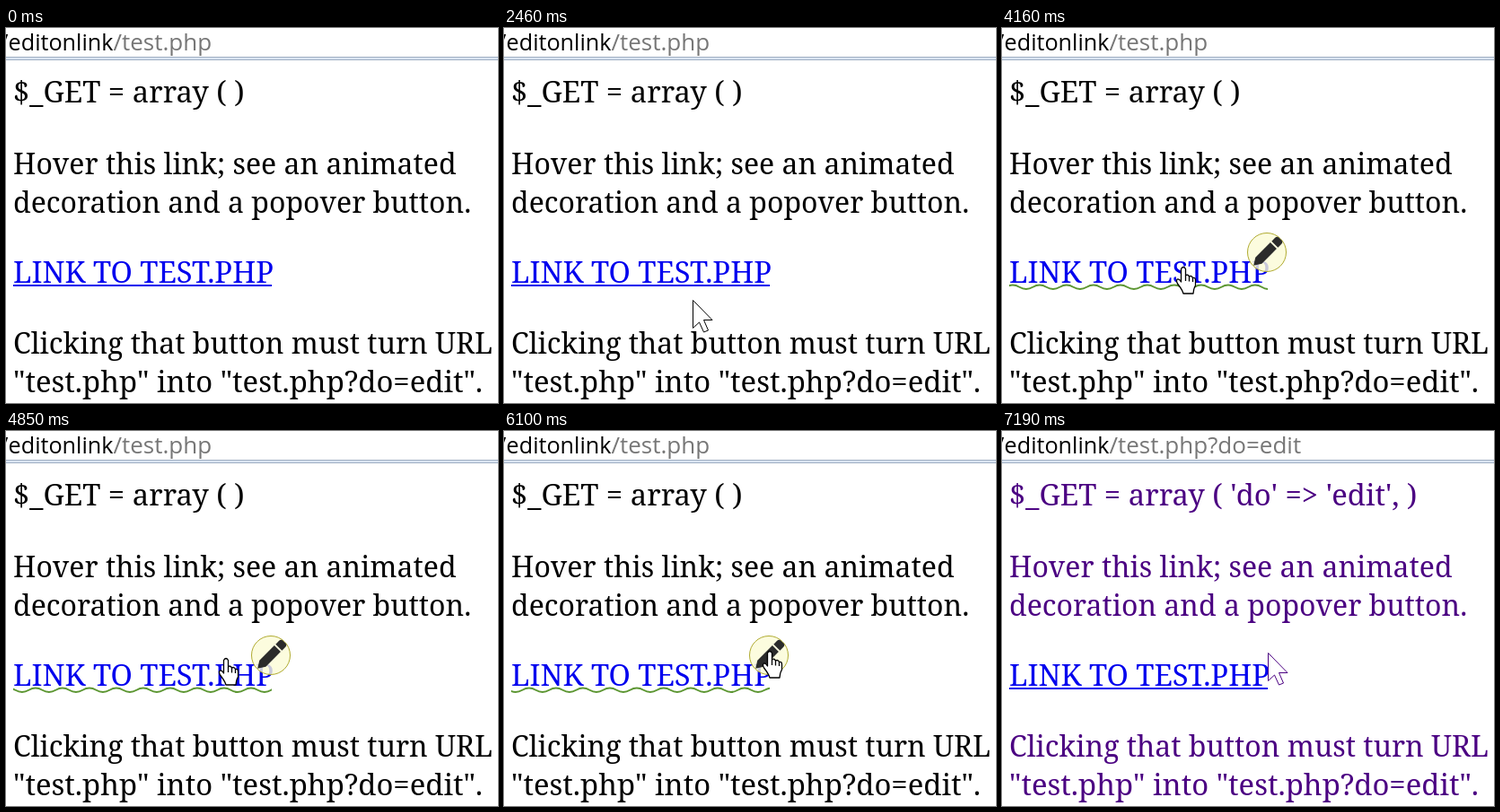
These frames come from a looping animation (548 px wide and 418 px high, 8000 ms). An HTML page:

```html
<!DOCTYPE html>
<html lang="en">
<head>
<meta charset="utf-8">
<title>Edit on link</title>
<style>
  html, body { margin: 0; width: 100%; height: 100%; overflow: hidden; background: #fff; }
  svg { display: block; }
  .bar { font: 25.2px "Open Sans", sans-serif; }
  #address { font-size: 26px; }
  .page { font: 32px "Noto Serif", serif; }
  .code { font-size: 32.8px; }
</style>
</head>
<body>
<svg width="548" height="418" viewBox="0 0 548 418">
  <defs><clipPath id="underlineBox"><rect x="8" y="284" width="288" height="9"/></clipPath></defs>

  <g class="bar">
    <text x="119.5" y="25" text-anchor="end">/editonlink</text>
    <text id="address" x="119.5" y="25" fill="#777"></text>
  </g>
  <rect y="32" width="548" height="4" fill="#d9e4f1"/>
  <path d="M0 32.5H548M0 35.5H548" stroke="#a0afc3"/>

  <g class="page" id="body">
    <text class="code" id="query" x="8" y="83"></text>
    <text x="8" y="162.5">Hover this link; see an animated</text>
    <text x="8" y="205.5">decoration and a popover button.</text>
    <text class="code" x="8" y="284" fill="#00e">LINK TO TEST.PHP</text>
    <text x="8" y="363">Clicking that button must turn URL</text>
    <text class="code" x="8" y="406">"test.php" into "test.php?do=edit".</text>
  </g>

  <path id="underline" d="M8 287H296" stroke="#00e" stroke-width="2"/>
  <g id="squiggle" clip-path="url(#underlineBox)">
    <path id="wave" fill="none" stroke="#5c9632" stroke-width="2"/>
  </g>

  <g id="button">
    <circle r="21.5" fill="#fcfcd6" fill-opacity=".8" stroke="#b0ab30"/>
    <path transform="rotate(-45)" fill="#2b2b2b"
      d="M-21 0L-13-5H10.5V5H-13ZM12.5-5H18Q21-5 21-2V2Q21 5 18 5H12.5Z"/>
  </g>

  <g id="cursor" fill="#fff" stroke-linejoin="round">
    <path id="arrow" transform="translate(-1 0)" d="M.5.5V31.5L7.5 25L12.5 36L17.5 34L12.5 22.5H22Z"/>
    <g id="hand" transform="translate(-9 -1)" stroke-width="1.3">
      <path d="M5.5 2.5Q8-1.5 10.5 2.5V10Q13 8 14.5 11Q17 9.5 18.5 12.5Q21.5 11.5 21.5 15.5V21Q19.5 24 19 30H8Q7 26 1.5 19Q-.5 15 1.5 14Q3.5 13.5 5.5 17Z"/>
      <path d="M10.5 10V16M14.5 11V16.5M18.5 12.5V17" fill="none"/>
    </g>
  </g>
</svg>
<script>
const LOOP = 8000, ENTER = 910, HOVER = 2760, CLICK = 7040, RELEASE = 7190;
const WAVE = 30, SHIFT_MS = 300;
const $ = id => document.getElementById(id);
const show = (id, on) => $(id).setAttribute('visibility', on ? 'visible' : 'hidden');
const move = (id, x, y) => $(id).setAttribute('transform', `translate(${x} ${y})`);

// Pointer hotspot: time, x, y
const track = [
  [910, 540, 281], [1450, 398, 293], [1680, 369, 302], [2290, 235, 307],
  [2459, 235, 307], [2460, 211, 303], [2759, 211, 303], [2760, 204, 290],
  [3170, 199, 284], [3550, 200, 280], [4160, 203, 267], [4390, 206, 262],
  [5230, 279, 248], [5560, 292, 247], [6100, 297, 246], [7190, 297, 247]
];

function pointerAt(t) {
  const i = track.findIndex(key => key[0] > t);
  if (i < 0) return track[track.length - 1].slice(1);
  if (i === 0) return track[0].slice(1);
  const [t0, x0, y0] = track[i - 1], [t1, x1, y1] = track[i];
  const k = (t - t0) / (t1 - t0);
  return [x0 + (x1 - x0) * k, y0 + (y1 - y0) * k].map(Math.round);
}

$('wave').setAttribute('d', 'M8 291' +
  'c7.5 0 7.5-4.5 15-4.5s7.5 4.5 15 4.5'.repeat(11));

function draw(t) {
  const hovering = t >= HOVER && t < CLICK;
  const edited = t >= CLICK;
  const ink = edited ? '#4b0082' : '#000';

  $('address').textContent = edited ? '/test.php?do=edit' : '/test.php';
  $('query').textContent = edited ? "$_GET = array ( 'do' => 'edit', )" : '$_GET = array ( )';
  $('body').setAttribute('fill', ink);

  show('underline', !hovering);
  show('squiggle', hovering);
  move('wave', -WAVE * ((t / SHIFT_MS + 0.5) % 1), 0);

  const popped = Math.min(1, Math.max(0, (t - HOVER) / 800));
  show('button', hovering);
  move('button', 271 + 24 * popped, 274 - 24 * popped);
  $('button').setAttribute('opacity', popped);

  const pointing = t >= HOVER && t < RELEASE;
  show('arrow', t >= ENTER && !pointing);
  show('hand', pointing);
  move('cursor', ...pointerAt(t));
  $('cursor').setAttribute('stroke', ink);
}

const start = performance.now();
function tick() {
  draw((performance.now() - start) % LOOP);
  requestAnimationFrame(tick);
}
tick();
</script>
</body>
</html>
```
